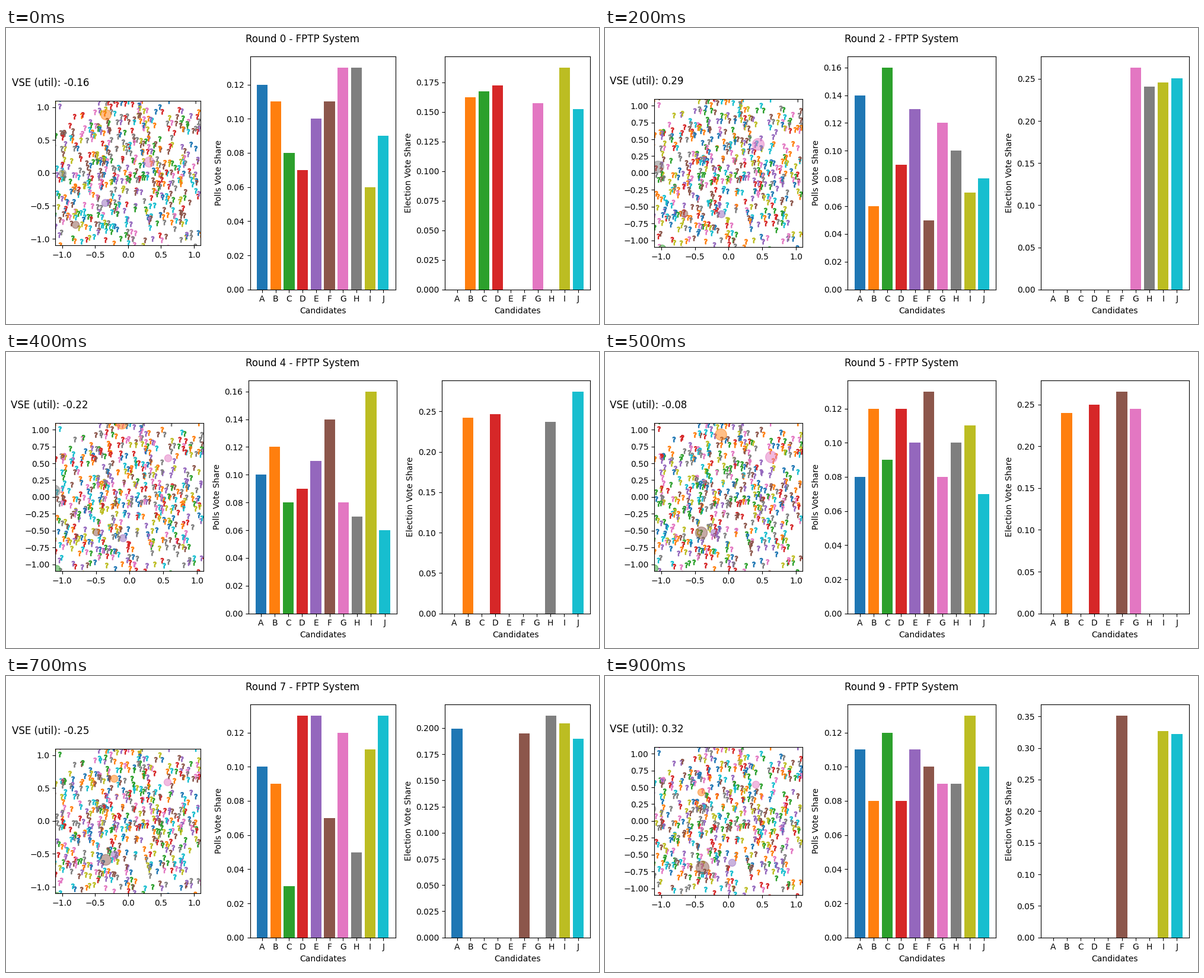
Write a matplotlib script that moves like this. It is 1000 px wide and 500 px high and loops after 1000 ms.

```python
import numpy as np
import matplotlib.pyplot as plt
from matplotlib.animation import FuncAnimation

NAMES = "ABCDEFGHIJ"
COLORS = np.array(plt.get_cmap("tab10").colors)

# VSE, poll ranking, best and worst poll (%), election ranking, winning share
ROUNDS = [
    (-.16, "GHAFBEJCDI", 13, 6, "IDCBGJ", .1875),
    (.07, "GBHECAJDIF", 14, 7, "GHJB", .2655),
    (.29, "CAEGHDJIBF", 16, 5, "GJIH", .2634),
    (-.55, "DFJICGHABE", 18, 3, "JACDG", .2069),
    (-.22, "IFBEADCGHJ", 16, 6, "JDBH", .2745),
    (-.08, "FBDIEHCGAJ", 13, 7, "FDGB", .2655),
    (.16, "EFBCGHDIAJ", 13, 6, "GBFAC", .2226),
    (-.25, "JDEGIABFHC", 13, 3, "HIAFJ", .2119),
    (.11, "DGEIAJBHCF", 13, 7, "FIAJ", .2672),
    (.32, "ICAEJFGHBD", 13, 8, "FIJ", .3514),
]

# Candidate positions (x + yj) at every third round
PATHS = dict(
    B=[-.34 + .89j, -.12 + 1.27j, -.12 + .76j, -.41 + .43j],
    C=[-.85 - 1.2j, -1.06 - 1.08j, -1.13 - 1.05j, -1 - 1.3j],
    E=[-.35 - .45j, .01 - .69j, -.33 - .45j, .05 - .62j],
    F=[-.8 - .78j, -.59 - .51j, -.32 - .54j, -.39 - .69j],
    G=[.32 + .17j, .5 + .56j, .7 + .62j, .4 + .54j],
    H=[-1 + 0j, -1.08 + .14j, -1.2 + 0j, -1.14 + .18j],
)

voters = np.random.default_rng(4).normal(0, 1, (1000, 2))

fig, (space, polls, votes) = plt.subplots(1, 3, figsize=(10, 5), dpi=100)
title = fig.suptitle("")


def poll_shares(ranking, best, worst):
    """Whole percents falling from best to worst, bent so the mean is 10."""
    bend = (10 - worst) / (best - 10)
    fall = np.linspace(0, 1, len(ranking)) ** bend
    return dict(zip(ranking, np.round(best - (best - worst) * fall) / 100))


def vote_shares(ranking, lead, step=.005):
    """The winner's share; the rest is split almost evenly."""
    n = len(ranking) - 1
    rest = (1 - lead) / n + step * ((n - 1) / 2 - np.arange(n))
    return dict(zip(ranking, [lead, *rest]))


def draw_space(k, vse, shares):
    space.clear()
    picks = np.random.default_rng(100 + k).integers(0, 10, len(voters))
    space.scatter(*voters.T, marker="$?$", c=COLORS[picks])
    for name, path in PATHS.items():
        spot = np.interp(k, (0, 3, 6, 9), path)
        space.scatter(spot.real, spot.imag, s=75 + 500 * shares.get(name, 0),
                      color=COLORS[NAMES.index(name)], alpha=.5)
    space.set(xlim=(-1.1, 1.1), ylim=(-1.1, 1.1), aspect="equal")
    space.text(-.3, 1.1, f"VSE (util): {vse:.2f}", fontsize=12,
               transform=space.transAxes)


def draw_bars(ax, shares, label):
    ax.clear()
    ax.bar(list(NAMES), [shares.get(n, 0) for n in NAMES], color=COLORS)
    ax.set(xlabel="Candidates", ylabel=label)


def update(k):
    vse, poll_rank, best, worst, vote_rank, lead = ROUNDS[k]
    shares = vote_shares(vote_rank, lead)
    title.set_text(f"Round {k} - FPTP System")
    draw_space(k, vse, shares)
    draw_bars(polls, poll_shares(poll_rank, best, worst), "Polls Vote Share")
    draw_bars(votes, shares, "Election Vote Share")
    # Fit from the default layout, so each round is independent of the last
    fig.subplots_adjust(left=.125, right=.9, bottom=.11, top=.88, wspace=.2)
    fig.tight_layout()


anim = FuncAnimation(fig, update, frames=10, interval=100, init_func=lambda: None,
                     repeat=True, repeat_delay=0)
plt.show()
```
